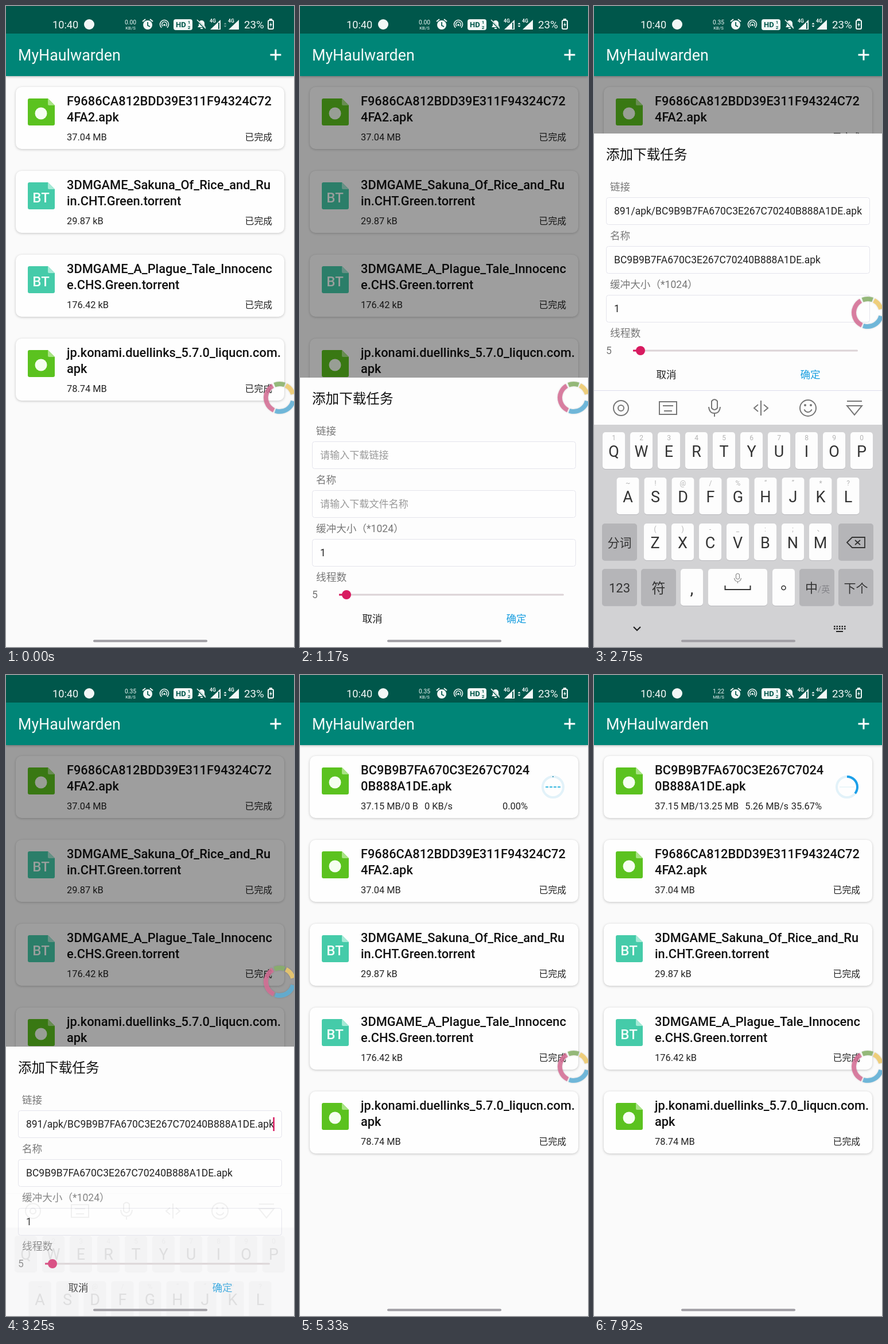
Animation, 502 px wide and 1116 px high, one loop 8 s. Source, as an HTML page with a canvas:

```html
<!DOCTYPE html>
<html lang="zh">
<head>
<meta charset="utf-8">
<style>
  html, body { margin: 0; height: 100%; overflow: hidden; background: #fafafa; }
  canvas { display: block; width: 502px; height: 1116px; }
</style>
</head>
<body>
<canvas></canvas>
<script>
const W = 502, H = 1116, LOOP = 8000, SHEET_HEIGHT = 469;
const ACCENT = '#d81b60', BAR = '#008577', STATUS = '#00574b';
const FILE = 'BC9B9B7FA670C3E267C70240B888A1DE.apk';
const canvas = document.querySelector('canvas');
const dpr = window.devicePixelRatio || 1;
canvas.width = W * dpr;
canvas.height = H * dpr;
const c = canvas.getContext('2d');
c.scale(dpr, dpr);

const downloads = [
  { lines: ['F9686CA812BDD39E311F94324C72', '4FA2.apk'], size: '37.04 MB' },
  { lines: ['3DMGAME_Sakuna_Of_Rice_and_Ru', 'in.CHT.Green.torrent'], size: '29.87 kB', bt: true },
  { lines: ['3DMGAME_A_Plague_Tale_Innocenc', 'e.CHS.Green.torrent'], size: '176.42 kB', bt: true },
  { lines: ['jp.konami.duellinks_5.7.0_liqucn.com.', 'apk'], size: '78.74 MB' },
];
const added = { lines: ['BC9B9B7FA670C3E267C7024', '0B888A1DE.apk'] };

// Progress of t through [from, to], linear and eased.
const ramp = (t, from, to) => Math.min(1, Math.max(0, (t - from) / (to - from)));
const ease = (t, from, to) => (1 - Math.cos(Math.PI * ramp(t, from, to))) / 2;

// y is the vertical centre of the capitals.
function text(str, x, y, size, color = '#222', align = 'left', weight = 400) {
  c.font = `${weight} ${size}px Roboto, "Noto Sans CJK SC", "Noto Sans CJK", sans-serif`;
  c.textAlign = align;
  c.fillStyle = color;
  c.fillText(str, x, y + size * 0.36);
}
function rect(x, y, w, h, color) {
  c.fillStyle = color;
  c.fillRect(x, y, w, h);
}
function box(x, y, w, h, r, fill, border) {
  c.beginPath();
  c.roundRect(x, y, w, h, r);
  if (fill) { c.fillStyle = fill; c.fill(); }
  if (border) { c.strokeStyle = border; c.lineWidth = 1; c.stroke(); }
}
function disc(x, y, r, color) {
  c.beginPath();
  c.arc(x, y, r, 0, 7);
  c.fillStyle = color;
  c.fill();
}
function arc(x, y, r, width, color, from = 0, to = 360) {
  c.beginPath();
  c.arc(x, y, r, from * Math.PI / 180, to * Math.PI / 180);
  c.strokeStyle = color;
  c.lineWidth = width;
  c.stroke();
}
function path(d, x, y, fill, stroke, width = 1.5) {
  const p = new Path2D(d);
  c.save();
  c.translate(x, y);
  if (fill) { c.fillStyle = fill; c.fill(p); }
  if (stroke) { c.strokeStyle = stroke; c.lineWidth = width; c.stroke(p); }
  c.restore();
}
function group(draw, { dy = 0, alpha = 1, clip } = {}) {
  c.save();
  if (clip) { c.beginPath(); c.rect(...clip); c.clip(); }
  c.translate(0, dy);
  c.globalAlpha *= alpha;
  draw();
  c.restore();
}

function statusBar(t) {
  const white = '#f2f7f6';
  rect(0, 0, W, 48, STATUS);
  text('10:40', 81, 32, 18.2, white);
  disc(145, 32, 9, white);
  const fast = t >= 6500;
  text(fast ? '1.22' : t >= 2670 ? '0.35' : '0.00', 217, 28, 10.3, white, 'center');
  text(fast ? 'MB/S' : 'KB/S', 217, 38, 7.8, white, 'center');
  disc(247, 33, 8, white);
  path('M-9 -6L-4 -10M9 -6L4 -10', 247, 33, null, white, 2);
  path('M0 -5V1L4 3', 247, 33, null, STATUS, 1.7);
  arc(276, 32, 7.5, 1.6, white, 130, 410);
  arc(276, 32, 4.3, 1.5, white, 130, 410);
  disc(276, 33, 1.8, white);
  box(292, 23, 33, 19, 4, white);
  text('HD', 296, 32.5, 13, STATUS, 'left', 700);
  text('1', 319, 28, 8, STATUS, 'center', 700);
  text('2', 319, 37, 8, STATUS, 'center', 700);
  path('M-7 5L-5 2V-2A5 5 0 0 1 5 -2V2L7 5ZM-2 6H2V8H-2Z', 341, 32, white);
  path('M-8 -7L7 8', 341, 32, null, STATUS, 3);
  path('M-8 -8L7 7', 341, 32, null, white, 1.5);
  for (const x of [356, 388]) {
    path('M18 -9V8H0Z', x, 33, white);
    text('4G', x - 1, 26, 8.5, white, 'left', 700);
  }
  rect(370, 29, 2, 11, STATUS);
  path('M-2.5 -1L0 -4L2.5 -1ZM-2.5 1L0 4L2.5 1Z', 382, 33, t < 1000 ? '#6f9e96' : white);
  text('23%', 415, 32, 18.8, white);
  box(457, 25, 9, 15, 2);
  c.strokeStyle = white; c.lineWidth = 2; c.stroke();
  rect(459, 22, 5, 3, white);
  path('M1 -5L-2.5 1H0L-1 5L2.5 -1H0Z', 461.5, 32.5, white);
}

function appBar(t) {
  c.save();
  c.shadowColor = 'rgba(0,0,0,.3)';
  c.shadowBlur = 4;
  c.shadowOffsetY = 1;
  rect(0, 48, W, 74, BAR);
  c.restore();
  text('MyHaulwarden', 21, 85, 26.8, '#f4faf9');
  const fade = 1 - ramp(t, 700, 900);
  if (t > 330 && fade) disc(470, 85, 26 * ease(t, 300, 500), `rgba(255,255,255,${0.26 * fade})`);
  path('M-9.5 0H9.5M0 -9.5V9.5', 470, 85, null, '#fff', 3);
}

function card(item, y, t) {
  c.save();
  c.shadowColor = 'rgba(0,0,0,.22)';
  c.shadowBlur = 4;
  c.shadowOffsetY = 1;
  box(17, y, 468, 108, 10, '#fefefe');
  c.restore();
  path('M3 0H35L47 12V44Q47 47 44 47H3Q0 47 0 44V3Q0 0 3 0Z', 38, y + 20, item.bt ? '#45cba9' : '#5bc21f');
  path('M35 0L47 12H37Q35 12 35 10Z', 38, y + 20, item.bt ? '#a5ead6' : '#a8e384');
  if (item.bt) text('BT', 61, y + 46, 24, '#f4fffb', 'center', 500);
  else disc(61, y + 46, 10.5, '#f5fff0');
  item.lines.forEach((line, i) => text(line, 106, y + 24 + 28 * i, 21.8, '#111', 'left', 500));
  if (item === added) progress(y, t);
  else {
    text(item.size, 106, y + 87, 16.4);
    text('已完成', 464, y + 87, 15.8, '#222', 'right');
  }
}

function progress(y, t) {
  const total = 37.15;
  const tick = Math.floor((t - 5420) / 250) * 250;
  const done = 13.25 * ramp(tick, 0, 2500);
  const share = done / total;
  const amount = done ? done.toFixed(2) + ' MB' : '0 B';
  const size = `${total} MB/${amount}`;
  text(size, 106, y + 87, 16.4);
  const end = 106 + c.measureText(size).width;
  text(done ? '5.26 MB/s' : '0 KB/s', end + 11, y + 87, 16.4);
  text((share * 100).toFixed(2) + '%', 397, y + 87, 16.4, '#222', 'right');
  arc(441, y + 54, 18, 4, '#e2f2f9');
  if (done) {
    arc(441, y + 54, 18, 4, '#1c9fe8', -90, -90 + 360 * share);
    rect(428, y + 53.5, 26, 1, '#d9eff5');
  } else {
    for (let i = 0; i < 4; i++) rect(428 + 7 * i, y + 53, 5, 2, '#3cb9e0');
    rect(440, y + 35, 2, 2, '#4b9fb8');
  }
}

function list(t) {
  const shift = 146 * ease(t, 4214, 4464);
  downloads.forEach((item, i) => card(item, 141 + 146 * i + shift, t));
  if (t > 4460) group(() => card(added, 141, t), { alpha: ramp(t, 4460, 4580) });
}

function field(label, y, value, hint) {
  text(label, 28, y, 17.6, '#777');
  box(21.5, y + 18.5, 459, 47, 4, '#fefefe', '#e4e4ec');
  text(value || hint, 35, y + 42, value ? 17.5 : 17.1, value ? '#222' : '#9a9a9a');
}

function sheet(t) {
  const filled = t >= 2150;
  rect(0, 0, W, H, '#fdfdfd');
  text('添加下载任务', 21, 37, 23.6, '#111');
  field('链接', 93, '', filled ? '' : '请输入下载链接');
  if (filled) {
    group(() => text('https://imtt.dd.qq.com/16891/apk/' + FILE, 467, 135, 17.5, '#222', 'right'),
      { clip: [34, 112, 434, 46] });
  }
  const blink = filled ? t - 2150 : t - 1200;
  if (blink >= 0 && blink % 1000 < 500) rect(filled ? 465.5 : 34, 123, 2.5, 24, ACCENT);
  field('名称', 178, filled && FILE, '请输入下载文件名称');
  field('缓冲大小（*1024）', 263, '1');
  text('线程数', 28, 348, 17.8, '#777');
  text('5', 21, 378, 17.5, '#777');
  box(68, 376.5, 392, 3, 1.5, '#dcd3d6');
  rect(68, 376.5, 13, 3, ACCENT);
  disc(81, 378, 8, ACCENT);
  text('取消', 126, 420, 17.6, '#222', 'center');
  text('确定', 377, 420, 17.6, '#1a9fe0', 'center');
}

function key(x, y, w, label, { dark, hint, size = 27 } = {}) {
  box(x, y + 1, w, 64, 5, '#b9b9bd');
  box(x, y, w, 64, 5, dark ? '#b5b5b8' : '#fdfdfd');
  if (hint) text(hint, x + w / 2, y + 10, 12, '#b4b4b4', 'center');
  text(label, x + w / 2, y + 33, size, '#333', 'center');
}

function toolbar() {
  const gray = '#777';
  arc(47, 700, 13, 2, gray);
  arc(47, 700, 5, 2, gray);
  path('M-15 -11H15V11H-15ZM-9 -4H9M-7 5H7', 129, 700, null, gray, 2);
  path('M-5 -12Q0 -18 5 -12V0Q0 6 -5 0ZM-10 -2Q-9 9 0 9T10 -2M0 9V15', 210, 700, null, gray, 2);
  path('M0 -13V13M-5 -6L-12 0L-5 6M5 -6L12 0L5 6', 291, 700, null, gray, 2);
  arc(373, 700, 14, 2, gray);
  arc(373, 700, 7, 2, gray, 20, 160);
  disc(368, 695, 2, gray);
  disc(378, 695, 2, gray);
  path('M-13 -12H13M-13 -4H13L0 12Z', 454, 700, null, gray, 2);
}

function clipboard() {
  rect(0, 637, 192, 33, '#fdfdfd');
  text('来自系统剪贴板', 16, 653, 24.2, '#333');
  text('https://imtt.dd.qq.com/168...', 26, 700, 29.2, '#c2185b', 'left', 300);
  arc(468, 700, 13, 1.6, '#444');
  path('M-5 -5L5 5M5 -5L-5 5', 468, 700, null, '#444', 1.6);
}

function keyboard(t) {
  rect(0, 669, W, 60, '#fdfdfd');
  rect(0, 669, W, 1, '#dcdcec');
  if (t >= 1500 && t < 2150) clipboard(); else toolbar();
  rect(0, 729, W, 500, '#d2d2d4');
  const rows = [['QWERTYUIOP', '1234567890', 15, 742], ['ASDFGHJKL', '~!@/%“”*?', 39.5, 821], ['ZXCVBNM', '()-_:;、', 87, 901]];
  for (const [letters, hints, x, y] of rows) {
    [...letters].forEach((letter, i) => key(x + 48 * i, y, 39, letter, { hint: hints[i] }));
  }
  key(14, 901, 61, '分词', { dark: true, size: 21 });
  key(426, 901, 61, '', { dark: true });
  path('M-16 0L-7 -9H15V9H-7ZM-2 -4L7 4M7 -4L-2 4', 457, 934, null, '#333', 1.8);
  key(14, 980, 61, '123', { dark: true, size: 22 });
  key(82, 980, 61, '符', { dark: true, size: 24 });
  key(151, 980, 39, ',', { size: 30 });
  key(199, 980, 103, '');
  path('M-22 0V7H22V0', 250.5, 1009, null, '#333', 2);
  path('M-3 -6Q0 -10 3 -6V0Q0 4 -3 0ZM-6 0Q-5 6 0 6T6 0M0 6V9', 250.5, 996, null, '#888', 1.2);
  key(311, 980, 39, '');
  arc(330.5, 1013, 3.5, 1.6, '#333');
  key(358, 980, 61, '', { dark: true });
  text('中', 379, 1013, 22, '#333', 'center');
  text('/英', 390, 1016, 15, '#85858a');
  key(426, 980, 61, '下个', { dark: true, size: 21 });
  path('M-6 -3L0 3L6 -3', 75, 1084, null, '#222', 2.2);
  for (let i = 0; i < 10; i++) rect(418 + (i % 5) * 4.5, 1079 + Math.floor(i / 5) * 4, 2.5, 2.5, '#222');
  rect(422, 1088, 12, 2, '#222');
}

function floatingRing(t) {
  const y = 682 - 148 * (ease(t, 1250, 1500) - ease(t, 3300, 3500));
  c.save();
  c.globalAlpha = 0.85;
  c.shadowColor = 'rgba(0,0,0,.2)';
  c.shadowBlur = 3;
  arc(477, y, 24, 8, '#d96f97', 115, 240);
  arc(477, y, 24, 8, '#88b368', 248, 291);
  arc(477, y, 24, 8, '#f2cd6c', 297, 345);
  arc(477, y, 24, 8, '#5fb2da', 14, 109);
  c.restore();
}

function draw(t) {
  rect(0, 0, W, H, '#fafafa');
  list(t);
  const open = ease(t, 409, 679) - ease(t, 4165, 4435);
  if (open > 0) {
    rect(0, 122, W, H, `rgba(0,0,0,${0.38 * open})`);
    const typing = t >= 1250 && t < 3083;
    const top = typing ? 222 : H - SHEET_HEIGHT * open;
    rect(0, top, W, H, '#fdfdfd');
    group(() => sheet(t), { dy: top, clip: [0, top, W, 1095 - top] });
  }
  appBar(t);
  statusBar(t);
  const show = ease(t, 1170, 1420), hide = ramp(t, 3080, 3300);
  if (show > 0 && hide < 1) {
    group(() => keyboard(t), { dy: 300 * (1 - show + hide), alpha: show * (1 - hide) ** 1.5 });
  }
  floatingRing(t);
  box(152, 1103.5, 199, 4, 2, '#9f9da3');
}

function frame() {
  draw(performance.now() % LOOP);
  requestAnimationFrame(frame);
}
frame();
</script>
</body>
</html>
```
